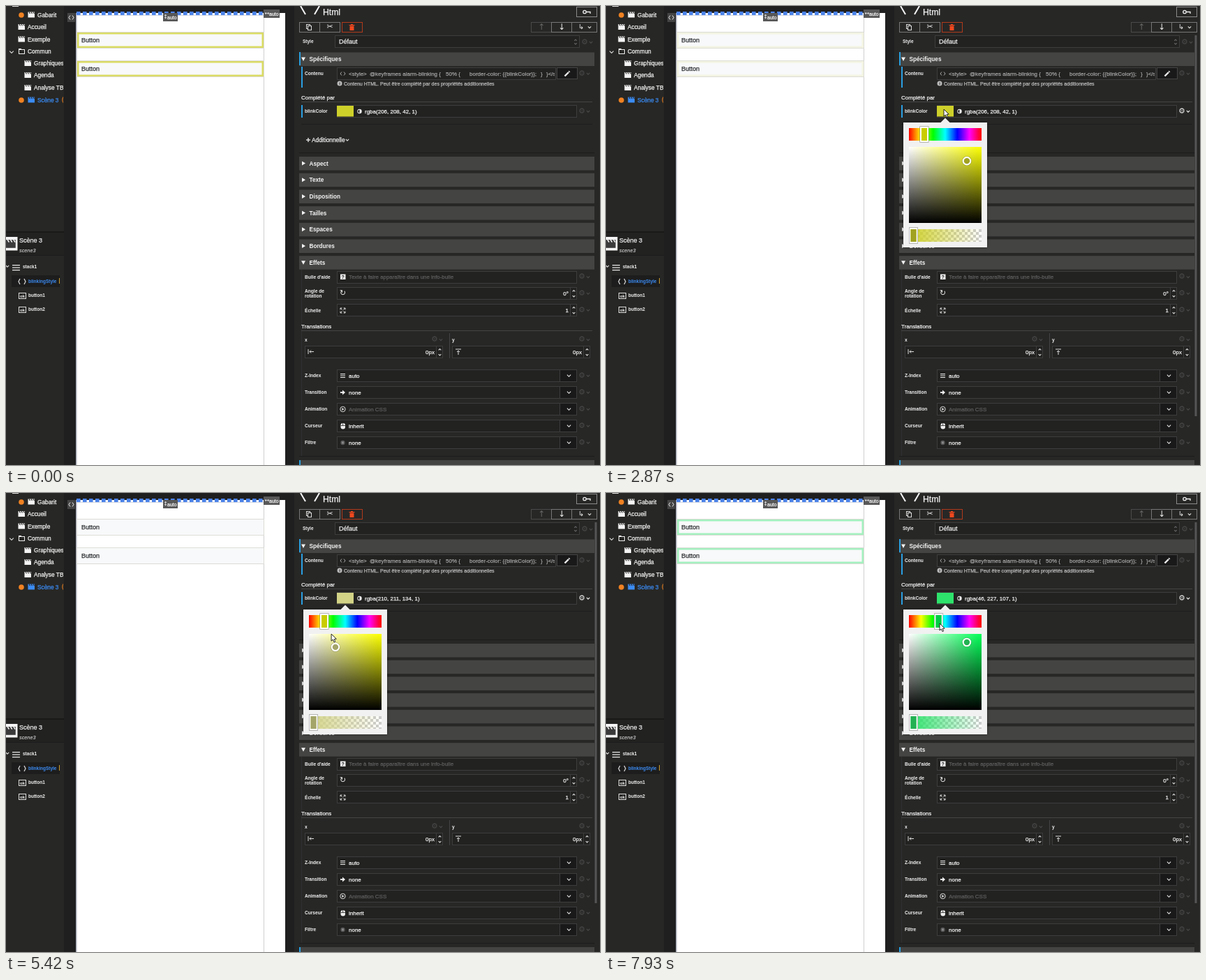
Write an HTML page with a canvas that moves like this. It is 851 px wide and 658 px high and loops after 8 s.

```html
<!DOCTYPE html>
<html lang="fr">
<head>
<meta charset="utf-8">
<style>
html, body { margin: 0; width: 100%; height: 100%; overflow: hidden; background: #272726; }
canvas { display: block; }
</style>
</head>
<body>
<canvas id="stage" width="851" height="658"></canvas>
<script>
const ctx = document.getElementById('stage').getContext('2d');
const LOOP = 8000, BLINK = 800, BLINK_PEAK = 230;
const PICKER_OPENS = 2150, PANEL_HOVER = 1500, ROW_HOVER = 1850;
const BLUE = '#2a9fe0', LINK = '#3b8cf5', ORANGE = '#f08222', DIM = '#4a4a4a';

// [time, x, y]
const cursorPath = [
  [1500, 849, 90], [1700, 600, 28], [1840, 505, 120], [1970, 483, 151], [2870, 484, 148], [3200, 484, 148],
  [3400, 517, 221], [3800, 479, 219], [4160, 509, 217], [4500, 514, 216], [4930, 496, 220],
  [5250, 472, 219], [5420, 466, 202], [5600, 481, 218], [6600, 483, 220], [6720, 504, 217],
  [7080, 517, 214], [7350, 458, 186], [7600, 471, 187], [7930, 478, 187]];
// [time, hue, saturation, value]
const colorPath = [
  [3400, 60.7, .798, .816], [3800, 61, .43, .839], [4160, 61.2, .701, .8392], [4500, 61, .77, .85],
  [4930, 61, .6, .83], [5250, 60.8, .365, .8275], [5540, 60.8, .365, .8275], [5600, 61.25, .4486, .8392],
  [6760, 61.25, .4486, .8392], [7080, 61, .7974, .8902], [7350, 61, .7974, .8902],
  [7600, 125, .7974, .8902], [7930, 140.2, .7974, .8902]];

function along(path, t) {
  const next = path.findIndex(p => p[0] > t);
  if (next === 0) return path[0].slice(1);
  if (next < 0) return path.at(-1).slice(1);
  const a = path[next - 1], b = path[next], k = (t - a[0]) / (b[0] - a[0]);
  return a.slice(1).map((v, i) => v + (b[i + 1] - v) * k);
}

function hsvToRgb(h, s, v) {
  return [5, 3, 1].map(n => {
    const k = (n + h / 60) % 6;
    return Math.round(255 * v * (1 - s * Math.max(0, Math.min(k, 4 - k, 1))));
  });
}

// CSS "ease", cubic-bezier(.25, .1, .25, 1)
function ease(x) {
  let lo = 0, hi = 1, u = .5;
  const bezier = (a, b) => 3 * a * u * (1 - u) ** 2 + 3 * b * u * u * (1 - u) + u ** 3;
  for (let i = 0; i < 18; i++) {
    u = (lo + hi) / 2;
    if (bezier(.25, .25) < x) lo = u; else hi = u;
  }
  return bezier(.1, 1);
}

function blinkLevel(t) {
  const phase = ((t - BLINK_PEAK) / BLINK % 1 + 1) % 1;
  return phase < .5 ? 1 - ease(phase * 2) : ease(phase * 2 - 1);
}

function rect(x, y, w, h, fill) { ctx.fillStyle = fill; ctx.fillRect(x, y, w, h); }

function frame(x, y, w, h, stroke, fill) {
  if (fill) rect(x, y, w, h, fill);
  ctx.strokeStyle = stroke; ctx.lineWidth = 1;
  ctx.strokeRect(x + .5, y + .5, w - 1, h - 1);
}

// Regular text gets a hairline stroke to give it a medium weight.
function text(str, x, y, size = 8, color = '#f0f0f0', style = '', align = 'left') {
  ctx.font = `${style} ${size}px "Liberation Sans", Arial, sans-serif`;
  ctx.fillStyle = ctx.strokeStyle = color;
  ctx.textAlign = align; ctx.lineWidth = .25;
  ctx.fillText(str, x, y);
  if (!style) ctx.strokeText(str, x, y);
}

function glyph(ch, x, y, size = 10, color = '#f0f0f0') {
  ctx.font = `${size}px "DejaVu Sans", sans-serif`;
  ctx.fillStyle = color; ctx.textAlign = 'center'; ctx.textBaseline = 'middle';
  ctx.fillText(ch, x, y);
  ctx.textBaseline = 'alphabetic';
}

function line(points, color, width = 1) {
  ctx.beginPath();
  points.forEach(([x, y]) => ctx.lineTo(x, y));
  ctx.strokeStyle = color; ctx.lineWidth = width; ctx.stroke();
}

function shape(points, fill) {
  ctx.beginPath();
  points.forEach(([x, y]) => ctx.lineTo(x, y));
  ctx.closePath(); ctx.fillStyle = fill; ctx.fill();
}

function disc(x, y, r, fill) { ctx.beginPath(); ctx.arc(x, y, r, 0, 7); ctx.fillStyle = fill; ctx.fill(); }

function ramp(x, y, w, h, vertical, stops) {
  const g = vertical ? ctx.createLinearGradient(0, y, 0, y + h) : ctx.createLinearGradient(x, 0, x + w, 0);
  stops.forEach((c, i) => g.addColorStop(i / (stops.length - 1), c));
  rect(x, y, w, h, g);
}

function clipped(x, y, w, h, draw) {
  ctx.save(); ctx.beginPath(); ctx.rect(x, y, w, h); ctx.clip(); draw(); ctx.restore();
}

// dir 1 points down, -1 points up
function chevron(x, y, color = '#ddd', dir = 1, r = 2.2) {
  line([[x - r, y - dir * r / 2], [x, y + dir * r / 2], [x + r, y - dir * r / 2]], color, 1.1);
}

function gear(x, y, color = DIM) {
  glyph('⚙', x, y, 11, color);
  chevron(x + 9, y, color);
}

function clapper(x, y, color = '#f4f4f4', notch = '#272726', k = 1) {
  rect(x, y - 4 * k, 9.5 * k, 8 * k, color);
  for (let i = 0; i < 3; i++) {
    const s = x + (1.5 + i * 3) * k;
    line([[s, y - 4 * k], [s + 1.5 * k, y - 1.6 * k]], notch, 1.1 * k);
  }
}

function drawSidebar() {
  rect(0, 0, 83, 658, '#272725');
  rect(9, 0, 9, 1, '#ddd');
  clipped(0, 0, 82, 658, () => {
    [['Gabarit', 12.5, 45], ['Accueil', 30, 31], ['Exemple', 47.5, 31], ['Commun', 65, 31],
     ['Graphiques', 82, 40], ['Agenda', 99, 40], ['Analyse TB', 117, 40], ['Scène 3', 134.5, 45]]
      .forEach(([name, y, x], i) => {
        const color = i === 7 ? LINK : '#f4f4f4';
        text(name, x, y + 3, 8.3, color);
        if (x === 45) disc(22, y + .5, 3.8, ORANGE);
        if (name !== 'Commun') clapper(x - 13.5, y, color);
      });
    text('(', 80, 137, 8.3, ORANGE);
  });
  chevron(8, 66, '#ddd', 1, 2.8);
  frame(18, 62, 9, 7, '#eee');
  rect(18, 61, 4, 2, '#eee');

  rect(0, 323, 83, 35, '#222221');
  rect(0, 323, 83, 2, '#191919');
  rect(0, 357, 83, 1, '#1c1c1c');
  rect(0, 331, 16.5, 19.5, '#f4f4f4');
  clapper(0, 341, '#3a3a3a', '#f4f4f4', 1.45);
  text('Scène 3', 19, 339, 9);
  text('scene3', 19, 353, 7.3, '#f0f0f0', 'italic');

  chevron(2, 373, '#ddd');
  [371, 374.5, 378].forEach(y => rect(9, y, 11, 1.2, '#eee'));
  text('stack1', 24, 376, 6.5, '#f0f0f0', 'bold');
  rect(8, 386, 69, 17, '#1d1d1d');
  line([[20, 391], [18, 395], [20, 399]], '#ddd', 1.2);
  line([[26, 391], [28, 395], [26, 399]], '#ddd', 1.2);
  text('blinkingStyle', 32, 396.5, 6.5, LINK, 'bold');
  rect(76, 390, 1, 8, '#c79a2a');
  ['button1', 'button2'].forEach((name, i) => {
    const y = 414.5 + i * 20.5;
    frame(18, Math.round(y) - 4, 11, 9, '#ddd');
    text('ok', 23.5, y + 3, 6, '#eee', 'bold', 'center');
    text(name, 32, y + 2, 6.5, '#f0f0f0', 'bold');
  });
}

function drawPage(rgb, level) {
  rect(83, 0, 330, 658, '#1f1f20');
  rect(100, 10, 300, 648, '#fff');
  rect(100, 10, 1.5, 648, '#a9abb8');
  rect(369, 13, 1, 645, '#cfcfd2');
  rect(101, 13, 268, 1, '#d5d8e2');
  for (let x = 101; x < 369; x += 9) rect(x, 8, Math.min(5.6, 369 - x), 5, '#4b83ea');

  rect(88, 10, 11, 13, '#444');
  line([[92, 13.5], [90, 16.5], [92, 19.5]], '#eee');
  line([[95, 13.5], [97, 16.5], [95, 19.5]], '#eee');
  rect(225, 10, 21, 12, '#585858');
  glyph('↕', 228.5, 16, 8);
  text('auto', 231, 18.5, 7);
  rect(369, 5, 23, 12, '#585858');
  glyph('↔', 374, 11, 8);
  text('auto', 377, 13.5, 7);

  const base = [248, 249, 250];
  const border = `rgb(${base.map((b, i) => b + (rgb[i] - b) * level)})`;
  [38, 79].forEach(y => {
    rect(101, y - 1, 269, 24, '#dcdcd6');
    rect(102, y, 267, 22, border);
    rect(104.5, y + 2.5, 262, 17, '#f8f9fa');
    text('Button', 108, y + 14, 9, '#2a2d30');
  });
}

function header(name, y, open) {
  rect(420, y - 9.5, 423, 19.5, '#444443');
  shape(open ? [[423, y - 2.5], [429, y - 2.5], [426, y + 3]] : [[424, y - 3], [429, y], [424, y + 3]], '#f4f4f4');
  text(name, 434.5, y + 3, 8.2, '#f4f4f4', 'bold');
}

function label(name, y, x = 428) { text(name, x, y + 2, 6.6, '#f0f0f0', 'bold'); }

function field(y, x = 474, w = 344) { frame(x, Math.round(y) - 9, w, 18, '#3d3d3d', '#222221'); }

function numberField(y, value, x, w) {
  field(y, x, w);
  const right = x + w;
  text(value, right - 12, y + 3, 8, '#f0f0f0', '', 'right');
  rect(right - 10, y - 8, 1, 16, '#3d3d3d');
  chevron(right - 4.5, y - 3.5, '#ddd', -1, 1.8);
  chevron(right - 4.5, y + 4, '#ddd', 1, 1.8);
}

function drawToolbar() {
  line([[422, 0], [429, 12]], '#f4f4f4', 2);
  line([[449, 0], [442, 12]], '#f4f4f4', 2);
  text('Html', 454, 12.5, 12.2, '#f4f4f4');
  frame(817, 1, 30, 15, '#8a8a8a');
  ctx.beginPath(); ctx.arc(829, 8.5, 2.2, 0, 7);
  ctx.strokeStyle = '#eee'; ctx.lineWidth = 1.3; ctx.stroke();
  line([[831, 8.5], [837, 8.5], [837, 11]], '#eee', 1.3);

  frame(420, 23, 30, 15, '#777'); frame(449, 23, 30, 15, '#777');
  frame(481, 23, 30, 15, '#b03a1c');
  frame(752, 23, 30, 15, '#4a4a4a'); frame(781, 23, 30, 15, '#777'); frame(810, 23, 37, 15, '#777');
  frame(430, 26, 6, 7, '#ddd'); frame(432, 28, 6, 7, '#ddd', '#272726');
  glyph('✂', 464, 30.5, 11);
  rect(492.5, 28.5, 6, 6.5, '#f0481e'); rect(491.5, 27, 8, 1, '#f0481e'); rect(494, 26, 3, 1, '#f0481e');
  glyph('↑', 767, 30.5, 12, '#666'); glyph('↓', 796, 30.5, 12);
  glyph('↳', 824, 30.5, 10); chevron(836, 30.5);
  text('Style', 425, 53, 6.5, '#f0f0f0', 'bold');
  frame(471, 42, 351, 18, '#3d3d3d', '#222221');
  text('Défaut', 477, 54, 9);
  chevron(816, 49, '#666', -1, 1.8); chevron(816, 54, '#666', 1, 1.8);
  gear(829, 52);
}

function drawSpecifics(rgb, hovered) {
  header('Spécifiques', 76, true);
  rect(420, 66, 2, 19, BLUE);
  rect(423, 87, 2, 30, BLUE);
  label('Contenu', 97);
  field(97, 474, 314);
  line([[481, 94.5], [479, 97], [481, 99.5]], '#aaa');
  line([[484, 94.5], [486, 97], [484, 99.5]], '#aaa');
  clipped(474, 88, 312, 18, () => {
    [['<style>', 491], ['@keyframes alarm-blinking {', 521], ['50% {', 630],
     ['border-color: {{blinkColor}};', 664], ['}', 766], ['}</style>', 774]]
      .forEach(([code, x]) => text(code, x, 99.5, 8, '#a0a0a0'));
  });
  frame(789, 88, 30, 17, '#444', '#191919');
  line([[800.5, 100.5], [806, 95]], '#f4f4f4', 2.4);
  line([[806.5, 94.5], [807.5, 93.5]], '#f4f4f4', 2.4);
  gear(825, 97);
  disc(478, 111, 3.5, '#bbb');
  text('i', 478, 113.3, 6, '#222', 'bold', 'center');
  text('Contenu HTML. Peut être complété par des propriétés additionnelles', 484, 114, 7.08, '#b8b8b8');

  text('Complété par', 423, 133.5);
  rect(423, 137, 417, 1, '#444');
  rect(423, 142, 2, 18, BLUE);
  label('blinkColor', 150.5);
  field(151);
  rect(474, 143, 24, 15.5, `rgb(${rgb})`);
  disc(506.5, 151, 3.2, '#f0f0f0');
  ctx.beginPath(); ctx.arc(506.5, 151, 2.3, -Math.PI / 2, Math.PI / 2, true);
  ctx.fillStyle = '#222'; ctx.fill();
  text(`rgba(${rgb.join(', ')}, 1)`, 514, 153.5);
  gear(825, 151, hovered ? '#f4f4f4' : DIM);
  rect(423, 169, 417, 1, '#1e1e1e');
  line([[430, 192], [436, 192]], '#eee', 1.3);
  line([[433, 189], [433, 195]], '#eee', 1.3);
  text('Additionnelle', 438, 195, 8.3);
  chevron(489, 192);
  rect(420, 210, 423, 1, '#1c1c1c');
}

function drawEffects() {
  label("Bulle d'aide", 388.5); field(388.5);
  rect(479, 384.5, 7.5, 7.5, '#eee'); text('?', 482.7, 391, 7, '#222', 'bold', 'center');
  text('Texte à faire apparaître dans une info-bulle', 491, 391, 7.9, '#5c5c5c');
  label('Angle de', 408.5); label('rotation', 416);
  numberField(412, '0°', 474, 344); glyph('↻', 482.5, 412, 11);
  label('Échelle', 436.5); numberField(436, '1', 474, 344);
  [[-1, -1], [1, -1], [-1, 1], [1, 1]].forEach(([a, b]) => {
    const x = 482.5 + a * 3.5, y = 436.5 + b * 3.5;
    line([[x - a * 2.4, y], [x, y], [x, y - b * 2.4]], '#ddd');
    line([[x, y], [x - a * 2.6, y - b * 2.6]], '#ddd');
  });
  [388.5, 412, 436].forEach(y => gear(825, y));

  text('Translations', 423, 461.5);
  rect(423, 465, 417, 1, '#444');
  rect(635, 469, 1, 36, '#444');
  label('x', 478.5); label('y', 478.5, 639);
  gear(614, 478.5); gear(825, 478.5);
  numberField(496, '0px', 428, 198); numberField(496, '0px', 639, 198);
  line([[433, 492], [433, 499]], '#ddd');
  line([[441, 495.5], [435, 495.5]], '#ddd');
  line([[437, 493.5], [435, 495.5], [437, 497.5]], '#ddd');
  line([[644, 492], [652, 492]], '#ddd');
  line([[648, 500], [648, 494]], '#ddd');
  line([[646, 496], [648, 494], [650, 496]], '#ddd');

  [['Z-Index', 'auto'], ['Transition', 'none'], ['Animation', 'Animation CSS'], ['Curseur', 'inherit'], ['Filtre', 'none']]
    .forEach(([name, value], i) => {
      const y = 530 + i * 24;
      label(name, y); field(y);
      frame(793, y - 9, 25, 18, '#3d3d3d', '#191919');
      chevron(806.5, y, '#eee', 1, 2.6);
      text(value, 491, y + 3, 8, i === 2 ? '#5c5c5c' : '#f0f0f0');
      gear(825, y);
    });
  [527, 529.5, 532].forEach(y => rect(479, y, 7, 1, '#eee'));
  rect(479, 553, 4, 2, '#eee'); shape([[482, 550.5], [486, 554], [482, 557.5]], '#eee');
  ctx.beginPath(); ctx.arc(482.5, 578, 3.7, 0, 7); ctx.strokeStyle = '#ddd'; ctx.lineWidth = 1; ctx.stroke();
  shape([[481.3, 576], [484.6, 578], [481.3, 580]], '#ddd');
  ctx.beginPath(); ctx.roundRect(479.5, 598, 6.5, 8.5, 3); ctx.fillStyle = '#eee'; ctx.fill();
  rect(479.5, 601, 6.5, .8, '#222'); rect(482.3, 598, .8, 3, '#222');
  disc(482.5, 626, 3.2, '#555'); rect(481, 624.5, 3, 3, '#888');
}

function drawPanel(t, rgb) {
  rect(413, 0, 438, 658, '#272726');
  drawToolbar();
  drawSpecifics(rgb, t >= ROW_HOVER);
  rect(423, 377, 1, 268, '#303030');
  ['Aspect', 'Texte', 'Disposition', 'Tailles', 'Espaces', 'Bordures', 'Effets']
    .forEach((name, i) => header(name, 225.5 + i * 23.7, i === 6));
  drawEffects();
  rect(420, 645, 423, 1, '#1c1c1c');
  rect(420, 651, 423, 7, '#444443');
  rect(420, 651, 2, 7, BLUE);
  if (t >= PANEL_HOVER) rect(843.5, 42, 3, 546, '#555');
}

function handle(x, y, fill) {
  frame(x - 6.5, y - 11.5, 13, 23, '#777');
  ctx.strokeStyle = '#fff'; ctx.lineWidth = 2;
  ctx.strokeRect(x - 5, y - 10, 10, 20);
  rect(x - 4, y - 9, 8, 18, fill);
}

function drawPicker([h, s, v], rgb) {
  ctx.save();
  ctx.shadowColor = 'rgba(0,0,0,.4)'; ctx.shadowBlur = 4;
  rect(426, 167, 120, 179, '#f1f1f1');
  ctx.restore();
  shape([[479, 167.5], [486, 160.5], [493, 167.5]], '#f1f1f1');

  const x = 434, w = 104, shade = `rgb(${rgb.map(c => c * .78)})`;
  ramp(x, 175, w, 18, false, ['#f00', '#ff0', '#0f0', '#0ff', '#00f', '#f0f', '#f00']);
  handle(440.2 + h / 360 * 93.4, 184, `rgb(${hsvToRgb(h, 1, .8)})`);

  rect(x, 202, w, 109, `hsl(${h}, 100%, 50%)`);
  ramp(x, 202, w, 109, false, ['#fff', 'rgba(255,255,255,0)']);
  ramp(x, 202, w, 109, true, ['rgba(0,0,0,0)', '#000']);
  const kx = x + s * w, ky = 202 + (1 - v) * 109.5;
  disc(kx, ky, 6.8, 'rgba(0,0,0,.25)');
  disc(kx, ky, 6.3, '#fff');
  disc(kx, ky, 4.2, shade);

  rect(x, 320, w, 18, '#fff');
  for (let i = 0; i < 26; i++)
    for (let j = 0; j < 5; j++)
      if ((i + j) % 2) rect(x + i * 4, 320 + j * 4, 4, j < 4 ? 4 : 2, '#ccc');
  ramp(x, 320, w, 18, false, [`rgb(${rgb})`, `rgba(${rgb}, 0)`]);
  handle(440.5, 329, shade);
}

function drawCursor(x, y) {
  const outline = [[0, 0], [0, 10], [2.3, 8], [4, 11.6], [5.7, 10.8], [4.1, 7.4], [7.2, 7.1]]
    .map(([dx, dy]) => [x + dx, y + dy]);
  shape(outline, '#fff');
  line([...outline, outline[0]], '#111', .9);
}

function draw(now) {
  const t = now % LOOP;
  const hsv = along(colorPath, t), rgb = hsvToRgb(...hsv);
  drawPage(rgb, blinkLevel(t));
  drawSidebar();
  drawPanel(t, rgb);
  if (t >= PICKER_OPENS) drawPicker(hsv, rgb);
  if (t >= PANEL_HOVER) drawCursor(...along(cursorPath, t));
  requestAnimationFrame(draw);
}

draw(0);
</script>
</body>
</html>
```
